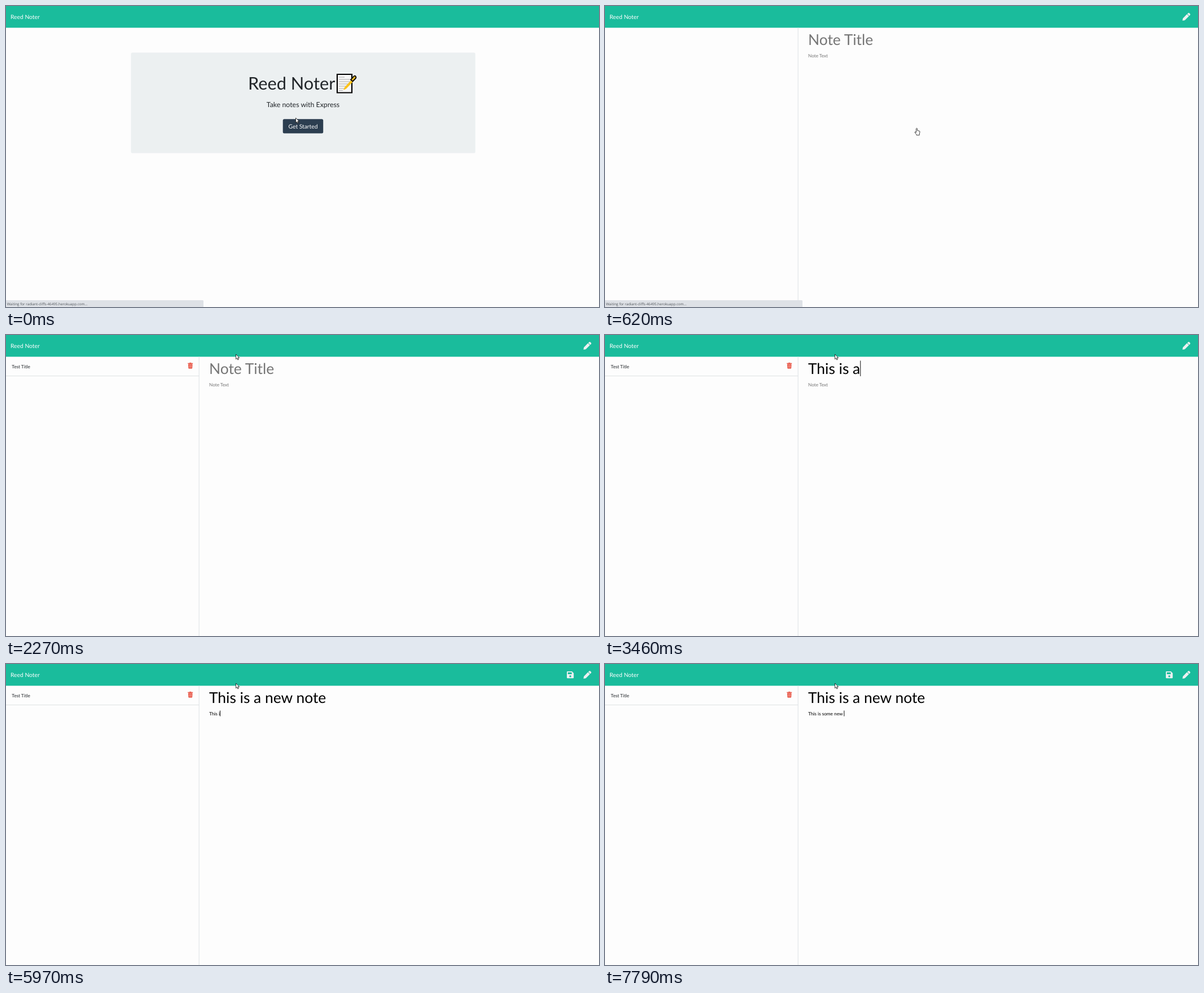
Write an HTML page that moves like this. It is 1051x533 px and loops after 8000 ms.

```html
<!DOCTYPE html>
<html lang="en">
<head>
<meta charset="utf-8">
<title>Reed Noter</title>
<style>
  html, body { margin: 0; width: 100%; height: 100%; overflow: hidden; background: #fdfdfd; }
  svg { display: block; width: 1051px; height: 533px; font-family: Lato, sans-serif; }
  text { white-space: pre; text-rendering: geometricPrecision; fill: #212529; }
  .light { fill: #fff; }
  .brand { font-size: 10.3px; }
  .title { font-size: 26.4px; }
  .small { font-size: 8.23px; }
  .icon { fill: #ecf0f1; fill-rule: evenodd; }
  .cursor { fill: #fff; stroke: #111; stroke-width: .8; stroke-linejoin: round; }
  .caret { fill: #111; }
</style>
</head>
<body>
<svg viewBox="0 0 1051 533">
  <rect width="1051" height="38.5" fill="#1abc9c"/>
  <text class="brand light" x="8" y="23">Reed Noter</text>

  <g id="home">
    <rect x="221.5" y="82.5" width="610.3" height="178" rx="2.6" fill="#ecf0f1"/>
    <text x="429" y="148" font-size="30.75">Reed Noter</text>
    <g id="memo">
      <path d="M587 121H613V153.5H587Z" fill="#f7f7f7" stroke="#000" stroke-width="2.2"/>
      <path d="M590 126H600M590 130H610M590 134H610M590 138H607M590 142H604M590 146H600M590 149.5H597"
            stroke="#aaa" stroke-width="1.2"/>
      <path d="M598 149L600 144L612 131L615 134L603 146.500Z" fill="#fcc21b"/>
      <path d="M611 130.500L617 124Q619 123 620 125Q621 126.500 619.500 128.500L614.500 133.500Z"
            fill="#f5b92a" stroke="#000" stroke-width="1.8"/>
    </g>
    <text x="526.500" y="179.300" font-size="12.35" text-anchor="middle">Take notes with Express</text>
    <rect id="ring" x="489" y="198.500" width="75" height="28.500" rx="3.500" fill="#8d97a1"/>
    <rect id="button" x="490.700" y="200.200" width="71.500" height="25.200" rx="2.500"/>
    <text class="brand light" x="526.500" y="216.600" text-anchor="middle">Get Started</text>
  </g>

  <g id="notes">
    <rect x="341.700" y="38.500" width="1" height="494.500" fill="#dfe2e4"/>
    <path class="icon" transform="translate(1023.500 12)"
          d="M10 .600Q11 -.200 12.100 .600L13.500 2Q14.300 3 13.500 4L12 5.400L8.600 2ZM7.900 2.600L11.400 6.100L4.200 13.300L0 14L.600 9.900Z"/>
    <path id="save" class="icon" transform="translate(994 13)"
          d="M1.300 0H9L12.200 3.200V11Q12.200 12.200 11 12.200H1.300Q0 12.200 0 11V1.300Q0 0 1.300 0ZM1.800 1.800V5H8.700V1.800ZM6.100 7A1.700 1.700 0 1 0 6.100 10.400A1.700 1.700 0 1 0 6.100 7Z"/>
    <g id="list">
      <text class="small" x="10.300" y="59">Test Title</text>
      <g transform="translate(322.200 49)" fill="#e74c3c">
        <path d="M0 .700H2.700L3.200 0H5.800L6.300 .700H9V2H0ZM.700 2.600H8.300L7.900 9.500Q7.800 10.400 7 10.400H2Q1.200 10.400 1.100 9.500Z"/>
        <path d="M2.700 4V9M4.500 4V9M6.300 4V9" stroke="#fdfdfd" stroke-width=".5"/>
      </g>
      <rect y="72" width="342" height="1" fill="#dfe2e4"/>
    </g>
    <text id="noteTitle" class="title" x="360" y="69"></text>
    <text id="noteText" class="small" x="360" y="90.700"></text>
    <rect id="titleCaret" class="caret" y="45.500" width="1" height="27.500"/>
    <rect id="textCaret" class="caret" y="82.500" width="1" height="10"/>
  </g>

  <g id="status">
    <path d="M0 521H348.500Q350 521 350 522.500V533H0Z" fill="#dee1e6"/>
    <text x="1.700" y="529.700" font-size="6.28" style="font-family: 'Open Sans', sans-serif; fill: #50555a">Waiting for radiant-cliffs-46495.herokuapp.com...</text>
  </g>

  <g id="pointer">
    <path id="arrow" class="cursor" d="M0 0V8.800L2 7L3.300 10L4.700 9.400L3.400 6.500H6.100Z"/>
    <path id="hand" class="cursor" d="M-1 1Q0 -.500 1 1V4.500L4.500 5.300Q5.700 5.600 5.500 7L4.700 11V12.700H-.500V11.500L-3.300 8Q-3.500 6.500 -2.200 6.900L-1 8Z"/>
    <path id="beam" d="M-1.800 -4.500H1.800M0 -4.500V4.500M-1.800 4.500H1.800" stroke="#222" stroke-width=".9"/>
  </g>
</svg>
<script>
const $ = id => document.getElementById(id);
const show = (id, on) => { $(id).style.display = on ? '' : 'none'; };

const LOOP = 8000, OPEN = 620, LOADED = 700, FOCUS = 1740, TAB = 4940;
// Mouse positions: [time, x, y]
const route = [
  [0, 513.5, 198], [230, 535, 209], [390, 552.5, 216], [700, 552.5, 216],
  [1100, 443, 123], [1420, 415, 72], [1660, 402, 59], [1740, 402, 59], [1970, 407.5, 34]
];
// Bursts of typing: [first key, last key, number of keys]
const titleKeys = [[2500, 3290, 8], [3460, 4480, 9], [4560, 4560, 1]];
const textKeys = [[5340, 5970, 6], [6370, 7390, 8], [7470, 7790, 3]];

function mouseAt(t) {
  const i = route.findIndex(p => p[0] > t);
  if (i < 0) return route.at(-1).slice(1);
  const [t0, x0, y0] = route[i - 1], [t1, x1, y1] = route[i];
  const k = (t - t0) / (t1 - t0);
  return [x0 + (x1 - x0) * k, y0 + (y1 - y0) * k];
}

function keysTyped(t, bursts) {
  return bursts.reduce((sum, [from, to, n]) =>
    t < from ? sum : sum + Math.min(n, 1 + Math.floor((t - from) / (to - from || 1) * (n - 1))), 0);
}

function field(id, caretId, full, placeholder, count, focused) {
  const el = $(id);
  el.textContent = count ? full.slice(0, count) : placeholder;
  el.style.fill = count ? '#000' : '#757575';
  show(caretId, focused);
  $(caretId).setAttribute('x', 360 + (count ? el.getComputedTextLength() : 0));
}

function draw(t) {
  const home = t < OPEN;
  show('home', home);
  show('notes', !home);
  show('list', t >= LOADED);
  show('status', t < LOADED);
  show('save', t >= textKeys[0][0]);
  show('ring', t >= 390);
  $('button').setAttribute('fill', t < 150 ? '#2c3e50' : '#1a252f');

  const blinkOff = t >= 2270 && t < titleKeys[0][0];
  field('noteTitle', 'titleCaret', 'This is a new note', 'Note Title',
    keysTyped(t, titleKeys), t >= FOCUS && t < TAB && !blinkOff);
  field('noteText', 'textCaret', 'This is some new ', 'Note Text',
    keysTyped(t, textKeys), t >= TAB);

  const tick = t < 70 ? 0 : 70 + Math.floor((t - 70) / 80) * 80;
  const [x, y] = mouseAt(tick);
  $('pointer').setAttribute('transform', `translate(${x} ${y})`);
  const shape = t < LOADED ? (y > 200 ? 'hand' : 'arrow') : y === 216 ? 'hand' : y < 43 ? 'arrow' : 'beam';
  for (const id of ['arrow', 'hand', 'beam']) show(id, id === shape);
}

function frame() {
  draw(performance.now() % LOOP);
  requestAnimationFrame(frame);
}
frame();
</script>
</body>
</html>
```
